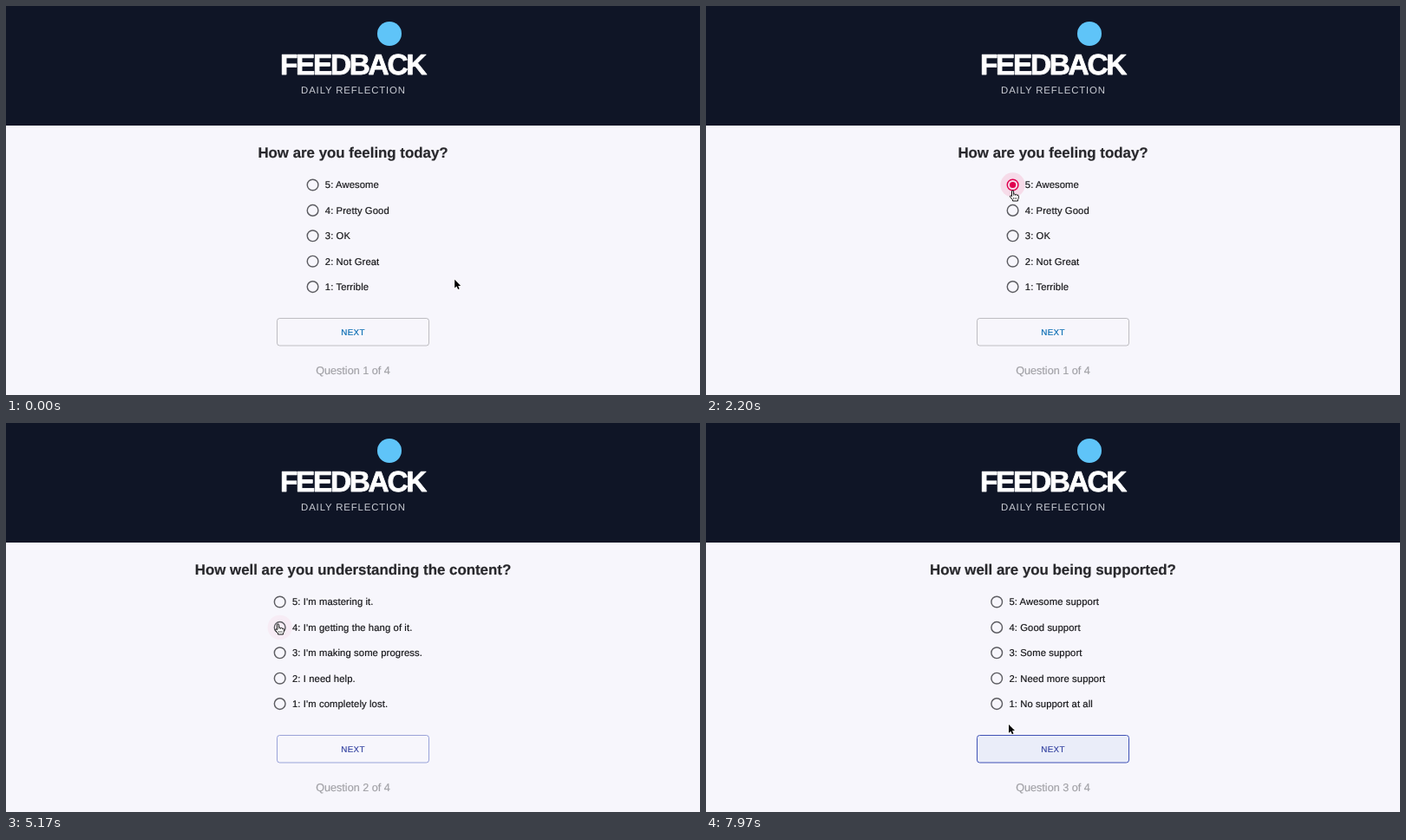
An HTML page with a canvas for the animation above (8000 ms loop, 800x449 px).

```html
<!DOCTYPE html>
<html lang="en">
<head>
<meta charset="utf-8">
<title>Daily reflection</title>
<style>
  html, body { margin: 0; width: 100%; height: 100%; overflow: hidden; background: #f7f6fc; }
  canvas { display: block; width: 800px; height: 449px; }
</style>
</head>
<body>
<canvas></canvas>
<script>
const canvas = document.querySelector('canvas');
const ctx = canvas.getContext('2d');
const dpr = window.devicePixelRatio || 1;
canvas.width = 800 * dpr;
canvas.height = 449 * dpr;

const LOOP = 8000, BG = '#f7f6fc', PINK = '#e0004f';
const ROW_TOP = 206.5, ROW_STEP = 29.4;
const BUTTON = [312.5, 360.5, 175, 31.5, 3];

const questions = [
  { start: 0, title: 'How are you feeling today?', x: 353.6, right: 444,
    options: ['5: Awesome', '4: Pretty Good', '3: OK', '2: Not Great', '1: Terrible'],
    pick: { row: 0, at: 1870, enter: 1317, leave: 2355 } },
  { start: 3180, title: 'How well are you understanding the content?', x: 315.7, right: 482,
    options: ["5: I'm mastering it.", "4: I'm getting the hang of it.", "3: I'm making some progress.",
      '2: I need help.', "1: I'm completely lost."],
    pick: { row: 1, at: 5530, enter: 4902, leave: 5740 } },
  { start: 7070, title: 'How well are you being supported?', x: 335.2, right: 463,
    options: ['5: Awesome support', '4: Good support', '3: Some support', '2: Need more support', '1: No support at all'] }
];

// Pointer stops: time, x, y
const stops = [
  [0, 517.5, 316], [800, 379.5, 243], [930, 379.5, 243], [1660, 353.5, 213], [2330, 353.5, 213],
  [2900, 369.5, 381], [4270, 369.5, 381], [5130, 313.5, 232], [5700, 313.5, 232],
  [6480, 350, 376], [7900, 350, 376], [7970, 349, 348], [LOOP, 349, 348]
];
const hovers = [[2700, 4333], [6221, LOOP]];
const presses = [[3100, 369, 381], [6970, 350, 376]];

const clamp = v => Math.max(0, Math.min(1, v));
const easeOut = p => 1 - (1 - p) ** 2;
const fade = (t, from, to, ms) => clamp((t - from) / ms) - clamp((t - to) / ms);

// heft thickens the glyphs with a fine outline
function text(str, x, y, size, color, { weight = 400, spacing = 0, align = 'left', heft = 0.2 } = {}) {
  ctx.font = `${weight} ${size}px "Liberation Sans", Arial, sans-serif`;
  ctx.letterSpacing = spacing + 'px';
  ctx.textAlign = align;
  ctx.fillStyle = ctx.strokeStyle = color;
  ctx.fillText(str, x, y);
  if (!heft) return;
  ctx.lineWidth = heft;
  ctx.strokeText(str, x, y);
}

function disc(x, y, r, color) {
  ctx.beginPath();
  ctx.arc(x, y, r, 0, 7);
  ctx.fillStyle = color;
  ctx.fill();
}

function drawHeader() {
  ctx.fillStyle = '#0f1526';
  ctx.fillRect(0, 0, 800, 138);
  disc(442, 32, 14, '#5fc4f8');
  text('FEEDBACK', 315.9, 79, 33.4, '#fff', { weight: 700, spacing: -2.3, heft: 0.8 });
  text('DAILY REFLECTION', 340.1, 101.2, 11.4, '#c9ccd4', { spacing: 0.85, heft: 0 });
}

function drawOption(label, x, y, pick, t) {
  const chosen = pick ? clamp((t - pick.at) / 150) : 0;
  if (pick) {
    const over = fade(t, pick.enter, pick.leave, 150);
    const ripple = fade(t, pick.at, pick.leave - 80, 250);
    disc(x, y, 14.2, `rgba(245,0,87,${0.04 * over})`);
    disc(x, y, 14.2 * easeOut(clamp((t - pick.at) / 300)), `rgba(245,0,87,${0.07 * ripple})`);
  }
  ctx.beginPath();
  ctx.arc(x, y, 6.33, 0, 7);
  ctx.strokeStyle = chosen ? PINK : '#5d5d62';
  ctx.lineWidth = 1.45;
  ctx.stroke();
  if (chosen) disc(x, y, 3.6 * chosen, PINK);
  text(label, x + 14.2, y + 3.8, 11.25, '#18181b', { spacing: 0.105 });
}

function drawButton(t, first) {
  const over = hovers.reduce((sum, [a, b]) => sum + fade(t, a, b, 200), 0);
  const rgb = first ? '0,0,0' : '63,81,181';
  const rest = first ? 0.23 : 0.5;
  ctx.save();
  ctx.beginPath();
  ctx.roundRect(...BUTTON);
  ctx.fillStyle = first ? `rgba(0,0,0,${0.06 * over})` : `rgba(63,110,210,${0.07 * over})`;
  ctx.fill();
  ctx.clip();
  for (const [at, x, y] of presses) {
    const age = t - at;
    if (age > 0 && age < 560) {
      const alpha = 0.2 * fade(age, 0, 160, 160) + 0.06 * fade(age, 0, 260, 300);
      disc(x, y, 150 * easeOut(age / 560), `rgba(63,81,181,${alpha})`);
    }
  }
  ctx.restore();
  ctx.beginPath();
  ctx.roundRect(...BUTTON);
  ctx.strokeStyle = `rgba(${rgb},${first ? rest : rest + (1 - rest) * over})`;
  ctx.lineWidth = 1;
  ctx.stroke();
  text('NEXT', 400, 379.9, 9.84, first ? '#0068b0' : '#303f9f', { spacing: 0.28, align: 'center' });
}

const arrow = new Path2D('M0 0V9.8L2.3 7.7L3.9 11.3L5.5 10.6L4 7.1H7Z');
const hand = new Path2D('M-1 1Q-1 0 0 0T1.1 1V4.2Q2.3 3.6 3 4.6Q4.3 4.1 5 5.1Q6.8 4.8 6.9 6.4' +
  'V8.4Q6.8 9.6 6 10.6V12H0V10.8L-2.9 7.4Q-3.5 6.2-2.5 5.9Q-1.8 5.9-1 6.9Z');
const fingers = new Path2D('M1.1 4.2V6M3 4.6V6.2M5 5.1V6.4M1 8V10M2.7 8V10M4.4 8V10');

function drawPointer(t, question) {
  const i = stops.findIndex((stop, k) => k && t < stop[0]);
  const [t0, x0, y0] = stops[i - 1], [t1, x1, y1] = stops[i];
  const p = easeOut((t - t0) / (t1 - t0));
  const x = x0 + (x1 - x0) * p, y = y0 + (y1 - y0) * p;
  const onLabel = x > question.x - 15 && x < question.right && y > 192 && y < 339;
  const onButton = x > 312 && x < 488 && y > 360 && y < 392;
  ctx.save();
  ctx.translate(x, y);
  ctx.lineJoin = 'round';
  if (onLabel || onButton) {
    ctx.fillStyle = '#fff';
    ctx.strokeStyle = '#111';
    ctx.lineWidth = 1;
    ctx.fill(hand);
    ctx.stroke(hand);
    ctx.lineWidth = 0.6;
    ctx.stroke(fingers);
  } else {
    ctx.strokeStyle = '#fff';
    ctx.lineWidth = 1.4;
    ctx.stroke(arrow);
    ctx.fillStyle = '#000';
    ctx.fill(arrow);
  }
  ctx.restore();
}

function draw() {
  const t = performance.now() % LOOP;
  const index = questions.findLastIndex(q => t >= q.start);
  const question = questions[index];
  ctx.setTransform(dpr, 0, 0, dpr, 0, 0);
  ctx.textRendering = 'geometricPrecision';
  ctx.lineJoin = 'round';
  ctx.fillStyle = BG;
  ctx.fillRect(0, 0, 800, 449);
  drawHeader();
  text(question.title, 400, 174.5, 16.87, '#28282c', { weight: 700, align: 'center' });
  question.options.forEach((label, row) => {
    const pick = question.pick?.row === row ? question.pick : null;
    drawOption(label, question.x, ROW_TOP + row * ROW_STEP, pick, t);
  });
  drawButton(t, index === 0);
  text(`Question ${index + 1} of 4`, 400, 425.2, 12.65, '#a2a2a7', { align: 'center' });
  drawPointer(t, question);
  requestAnimationFrame(draw);
}
draw();
</script>
</body>
</html>
```
